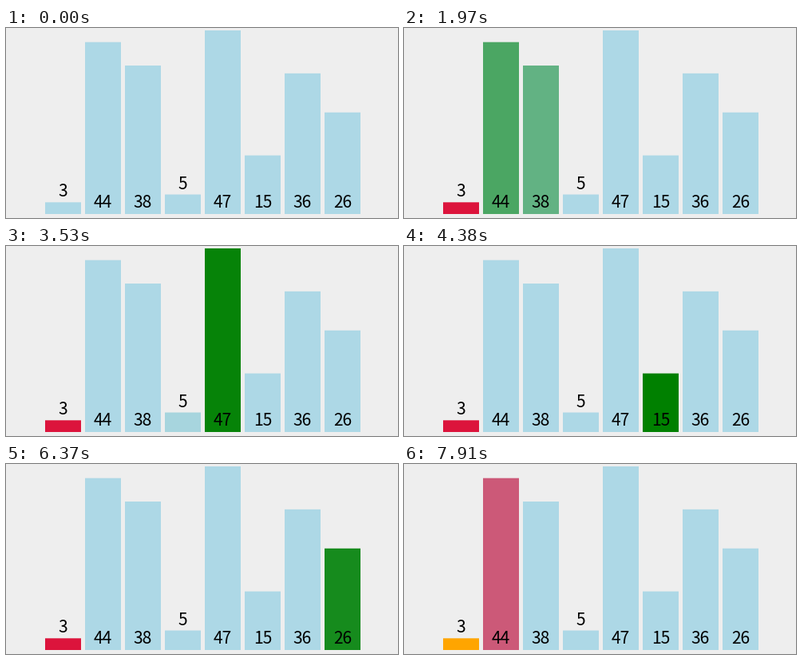
A matplotlib script that plays this animation: 491x238 px, repeating every 7.99 s.

```python
import numpy as np
import matplotlib.pyplot as plt
from matplotlib.animation import FuncAnimation
from matplotlib.colors import to_rgb
from matplotlib.patches import Rectangle

W, H, DPI = 491, 238, 100
LOOP, INTERVAL = 7990, 10

VALUES = [3, 44, 38, 5, 47, 15, 36, 26]
LEFT, BASE, BAR_W, PITCH = 49, 233, 45, 50
SCALE = 230 / max(VALUES)
FONT_PX = 21

IDLE, MIN, SCAN, DONE = map(
    lambda name: np.array(to_rgb(name)),
    ("lightblue", "crimson", "green", "orange"))

# Each phase starts a fixed period after the last and fades its bars.
FIRST, PERIOD, FADE = 371, 740, 250

# Ticks at which each phase is redrawn: first, last, count.
TICKS = [(500, 580, 2), (1200, 1360, 3), (1890, 2120, 4), (2670, 2900, 4),
         (3380, 3530, 3), (4140, 4380, 4), (4910, 5070, 3), (5600, 5840, 4),
         (6370, 6530, 3), (7140, 7220, 2), (7830, 7910, 2)]


def fades(phase):
    """Bars that change colour in a phase of the selection sort."""
    n = len(VALUES)
    if phase == 0:
        return {0: MIN}
    if phase == n + 1:
        return {0: DONE}
    if phase == n + 2:
        return {1: MIN}
    change = {}
    if phase > 1:
        change[phase - 1] = IDLE
    if phase < n:
        change[phase] = SCAN
    return change


def ease(t):
    t = min(max(t, 0), 1)
    return 4 * t ** 3 if t < 0.5 else 1 - 4 * (1 - t) ** 3


def bar_colors(ms):
    colors = [IDLE] * len(VALUES)
    for phase, (first, last, count) in enumerate(TICKS):
        if ms < first:
            break
        later = phase + 1 < len(TICKS) and ms >= TICKS[phase + 1][0]
        if later:
            mix = 1
        else:
            ticks = np.round(np.linspace(first, last, count), -1)
            tick = ticks[ticks <= ms][-1]
            mix = ease((tick - FIRST - PERIOD * phase) / FADE)
        for bar, goal in fades(phase).items():
            colors[bar] = colors[bar] + (goal - colors[bar]) * mix
    return colors


fig = plt.figure(figsize=(W / DPI, H / DPI), dpi=DPI, facecolor="#eeeeee")
ax = fig.add_axes([0, 0, 1, 1])
ax.set(xlim=(0, W), ylim=(H, 0))
ax.axis("off")

bars = []
for i, value in enumerate(VALUES):
    x, height = LEFT + PITCH * i, value * SCALE
    bar = Rectangle((x, BASE - height), BAR_W, height, lw=0, snap=False)
    bars.append(ax.add_patch(bar))
    # Short bars carry their label on top.
    y = BASE - 8 if height > 40 else round(BASE - height) - 7
    ax.text(x + BAR_W / 2, y, str(value), ha="center", va="baseline",
            family="Noto Sans CJK JP", size=FONT_PX * 72 / DPI, color="black")


def draw(frame):
    for bar, color in zip(bars, bar_colors(frame * INTERVAL)):
        bar.set_facecolor(np.clip(color, 0, 1))
    return bars


anim = FuncAnimation(fig, draw, frames=LOOP // INTERVAL, interval=INTERVAL,
                     repeat=True, repeat_delay=0)
plt.show()
```
